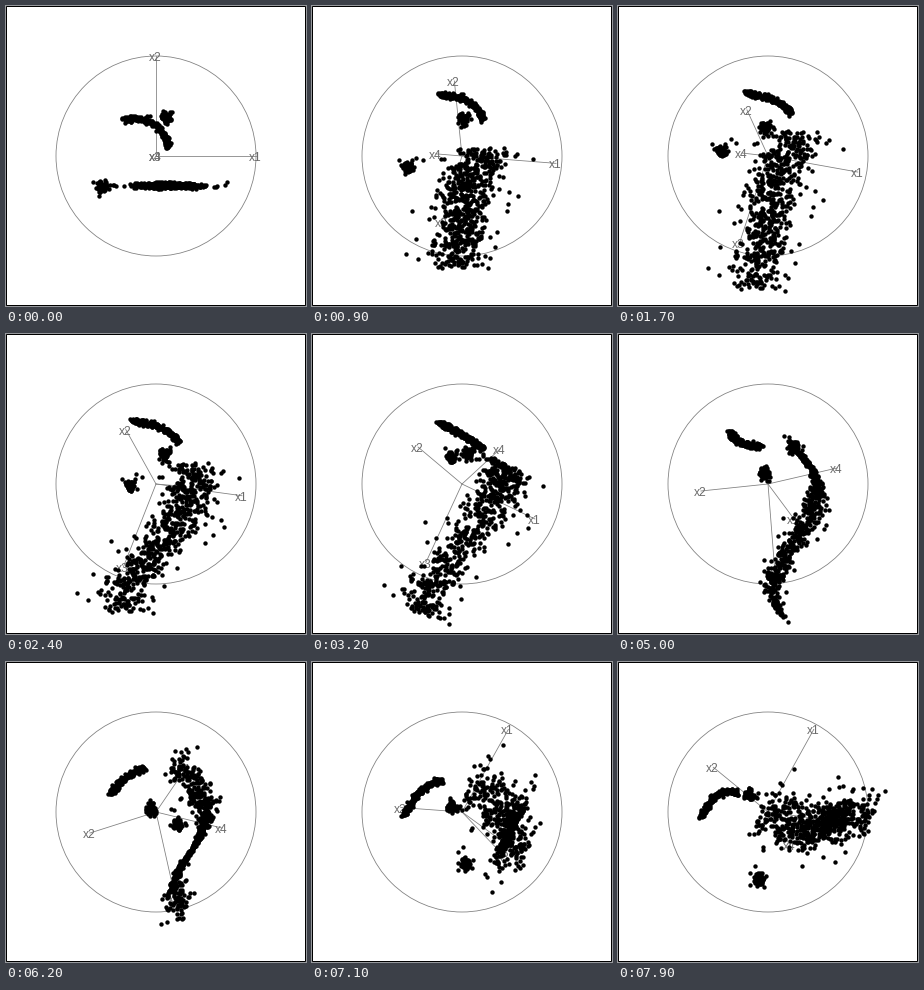
These frames come from a looping animation (300 by 300 pixels, 8 s). A matplotlib script:

```python
import numpy as np
import matplotlib.pyplot as plt
from matplotlib.animation import FuncAnimation
from matplotlib.patches import Circle, Rectangle

SIZE, MID, R = 300, 150, 100
PX = 0.72  # points per pixel at 100 dpi
GREY = "0.5"


# ---- four clusters in four dimensions, in pixel units ----
def make_data():
    rng = np.random.default_rng(11)

    def blob(center, n):
        return rng.normal(center, 3.1, (n, 4))

    def arc(n):
        a = np.radians(rng.uniform(8, 109, n))
        curve = np.column_stack([-22 + 34 * np.cos(a), 4 + 34 * np.sin(a),
                                 np.full(n, -47), np.full(n, -2)])
        return curve + rng.normal(0, 1.4, curve.shape)

    def sheet(n):
        x3 = rng.uniform(-46, 132, n) + rng.normal(0, 2.5, n)
        x4 = 36 * np.cos(np.pi * (x3 - 5) / 108) + rng.normal(0, 1.2, n)
        x1 = 14 - 0.06 * x3 + 13 * rng.standard_t(7, n)
        return np.column_stack([x1, rng.normal(-29.5, 1.2, n), x3, x4])

    return np.vstack([arc(220), blob((10, 38, -12, 30), 55),
                      blob((-54, -30, -12, 30), 45), sheet(620)])


# ---- tour path: constant-speed geodesics between projection planes ----
def view(z1, z2, z4):
    """Basis from three axis tips; orthonormality gives x3, pointing down."""
    z3 = np.sqrt(-(z1**2 + z2**2 + z4**2) + 0j)
    if z3.imag > 0:
        z3 = -z3
    z = np.array([z1, z2, z3, z4])
    u, _, vt = np.linalg.svd(np.column_stack([z.real, z.imag]),
                             full_matrices=False)
    return u @ vt


def leg(a, ta, b, tb):
    """Path over step numbers that passes a at ta and b at tb."""
    u, c, vt = np.linalg.svd(a.T @ b)
    c = np.clip(c, 0, 1)
    tau = np.arccos(c)
    ga = a @ u
    gz = (b @ vt.T - ga * c) / np.maximum(np.sin(tau), 1e-6)
    turn = u @ vt
    angle = np.arctan2(turn[1, 0], turn[0, 0])

    def at(i):
        s = (i - ta) / (tb - ta)
        cs, sn = np.cos(s * angle), np.sin(s * angle)
        spin = np.array([[cs, -sn], [sn, cs]])
        return (ga * np.cos(s * tau) + gz * np.sin(s * tau)) @ u.T @ spin

    return at


# The fourth leg is fixed by two views, the others join on to it.
leg4 = leg(view(.57 - .58j, -.64 + .08j, .46 + .55j), 42,
           view(.26 - .35j, -.67 - .07j, .69 + .16j), 50)
leg5 = leg(leg4(54), 55, view(.30 + .44j, -.66 - .21j, .66 - .16j), 62)
leg6 = leg(leg5(68), 69, view(.46 + .83j, -.55 + .45j, .22 - .33j), 79)
leg3 = leg(leg4(40), 39, view(.73 - .35j, -.44 + .37j, .38 + .35j), 32)
leg2 = leg(leg3(26), 25, view(.895 - .16j, -.21 + .46j, -.26 + .03j), 17)
leg1 = leg(view(1, 1j, 0), 0, leg2(15), 14)

LAST_STEP = {14: leg1, 25: leg2, 39: leg3, 54: leg4, 68: leg5, 79: leg6}


def projection(i):
    return next(path(i) for last, path in LAST_STEP.items() if i <= last)


# ---- drawing ----
data = make_data()
fig = plt.figure(figsize=(3, 3), dpi=100, facecolor="white")
ax = fig.add_axes([0, 0, 1, 1])
ax.set_xlim(0, SIZE)
ax.set_ylim(SIZE, 0)
ax.axis("off")

ax.add_patch(Rectangle((0.5, 0.5), SIZE - 1, SIZE - 1, fill=False,
                       ec="black", lw=PX, snap=False, zorder=4))
ax.add_patch(Circle((MID, MID), R, fill=False, ec=GREY, lw=0.8 * PX,
                    zorder=1))
spokes = [ax.plot([], [], color=GREY, lw=0.8 * PX, zorder=1)[0]
          for _ in range(4)]
labels = [ax.text(MID, MID, f"x{k + 1}", color="0.42", ha="center",
                  va="baseline", family="Liberation Sans",
                  fontsize=12 * PX, zorder=2) for k in range(4)]
dots, = ax.plot([], [], "o", color="black", ms=4.4 * PX, mew=0, zorder=3)


def draw(i):
    p = projection(i)
    xy = data @ p
    dots.set_data(MID + xy[:, 0], MID - xy[:, 1])
    for (x, y), spoke, label in zip(p * R, spokes, labels):
        spoke.set_data([MID, MID + x], [MID, MID - y])
        label.set_position((MID + x - 0.7, MID - y + 5))
    return [dots, *spokes, *labels]


anim = FuncAnimation(fig, draw, frames=80, interval=100, repeat=True,
                     repeat_delay=0, blit=False)
plt.show()
```
